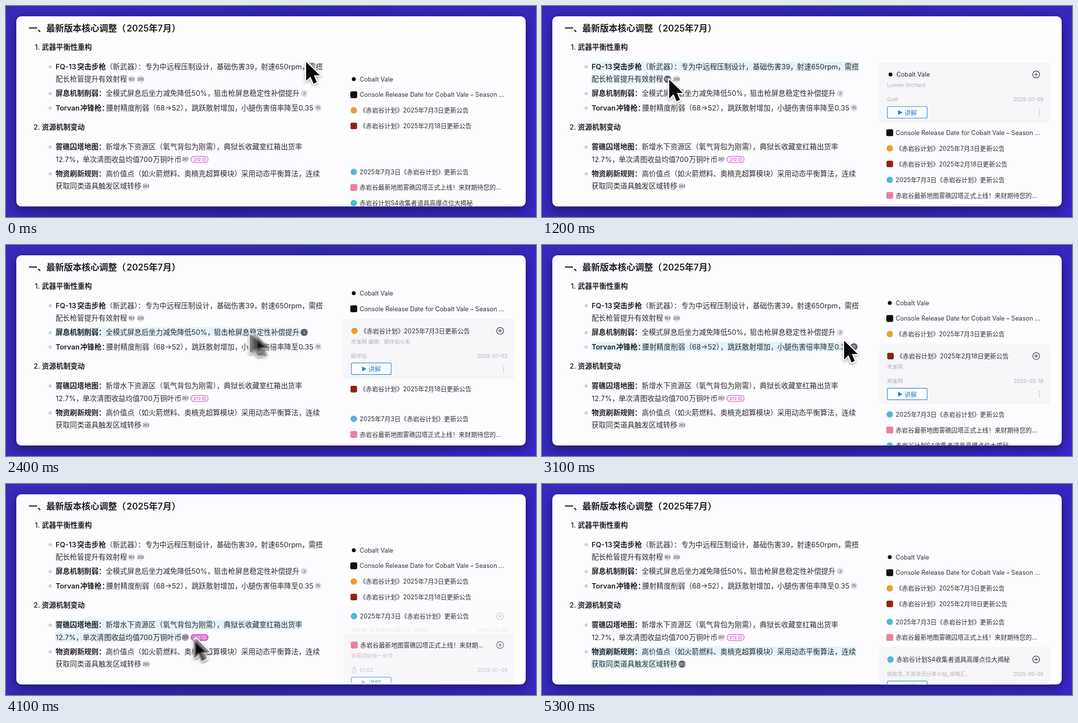
Write an HTML page with a canvas that moves like this. It is 1079x430 px and loops after 5400 ms.

```html
<!DOCTYPE html>
<html lang="zh-CN">
<head>
<meta charset="utf-8">
<title>资料引用悬停演示</title>
<style>
html, body { margin: 0; width: 100%; height: 100%; overflow: hidden; background: #3426b8; }
canvas { display: block; width: 1079px; height: 430px; }
</style>
</head>
<body>
<canvas id="stage"></canvas>
<script>
const W = 1079, H = 430, LOOP = 5400;
const FONT = 'Inter, "Noto Sans CJK SC", "Noto Sans CJK", "Noto Sans", sans-serif';
const canvas = document.getElementById('stage');
const dpr = window.devicePixelRatio || 1;
canvas.width = Math.round(W * dpr);
canvas.height = Math.round(H * dpr);
const ctx = canvas.getContext('2d');

const clamp = v => Math.max(0, Math.min(1, v));
const smooth = v => { v = clamp(v); return v * v * (3 - 2 * v); };
// Rises at a, falls at b, each over d ms.
const pulse = (t, a, b, d) => smooth((t - a) / d) * (1 - smooth((t - b) / d));

// Eased value between keys of the form [time, ...values].
function track(keys, t) {
  let i = 0;
  while (i < keys.length - 1 && keys[i + 1][0] <= t) i++;
  const a = keys[i], b = keys[i + 1] || a;
  const k = b === a ? 0 : smooth((t - a[0]) / (b[0] - a[0]));
  return a.slice(1).map((v, n) => v + (b[n + 1] - v) * k);
}

function text(str, x, y, size, color, weight = 400, align = 'left') {
  ctx.font = `${weight} ${size}px ${FONT}`;
  ctx.textAlign = align;
  ctx.fillStyle = color;
  ctx.fillText(str, x, y + size * 0.37);
}

function box(x, y, w, h, r, fill, stroke, line = 1) {
  ctx.beginPath();
  ctx.roundRect(x, y, w, h, r);
  if (fill) { ctx.fillStyle = fill; ctx.fill(); }
  if (stroke) { ctx.strokeStyle = stroke; ctx.lineWidth = line; ctx.stroke(); }
}

function disc(x, y, r, fill, stroke, line = 1) {
  ctx.beginPath();
  ctx.arc(x, y, r, 0, Math.PI * 2);
  if (fill) { ctx.fillStyle = fill; ctx.fill(); }
  if (stroke) { ctx.strokeStyle = stroke; ctx.lineWidth = line; ctx.stroke(); }
}

function faded(alpha, draw) {
  if (alpha <= 0) return;
  ctx.save();
  ctx.globalAlpha *= alpha;
  draw();
  ctx.restore();
}

/* ---------- article ---------- */

const BODY = 14.55, INK = '#2b2b30', BOLD = '#202024';

// y, then [x, text, bold]
const lines = [
  [123.5, [101, 'FQ-13', 1], [145, '突击步枪', 1], [203, '（新武器）'], [268.5, '：'],
    [283.5, '专为中远程压制设计，'], [429, '基础伤害39，'], [519, '射速650rpm，'], [616, '需搭']],
  [149, [101, '配长枪管提升有效射程']],
  [178, [101, '屏息机制削弱：', 1], [203, '全模式屏息后坐力减免降低50%，'], [423, '狙击枪屏息稳定性补偿提升']],
  [207.5, [101, 'Torvan', 1], [151, '冲锋枪：', 1], [204, '腰射精度削弱'], [291, '（68→52）'],
    [363, '，'], [378, '跳跃散射增加，'], [479, '小腿伤害倍率降至0.35']],
  [287, [101, '雾礁囚塔地图：', 1], [203, '新增水下资源区（氧气背包为刚需）'], [428.5, '，'],
    [443, '典狱长收藏室红箱出货率']],
  [312.5, [101, '12.7%，'], [156, '单次清图收益均值'], [272, '700'], [299, '万铜叶币']],
  [341.5, [101, '物资刷新规则：', 1], [203, '高价值点（如火箭燃料、奥楠克超算模块）'], [479, '采用动态平衡算法，连续']],
  [367, [101, '获取同类道具触发区域转移']]
];

// start, end, then [y, right edge] of each lit line
const lit = [
  [780, 1950, [123.5, 645], [149, 247]],
  [2100, 2700, [178, 599]],
  [2800, 3300, [207.5, 627]],
  [3450, 4510, [287, 603], [312.5, 357]],
  [4540, 9000, [341.5, 640], [367, 276]]
];

// x, y, label, active from, active until
const badges = [
  [255.5, 149, '163', 780, 1950],
  [274, 149, '200', 9000, 9000],
  [607, 178, '3', 2100, 2750],
  [635, 207.5, '10', 2800, 3300],
  [365, 312.5, '267', 4050, 4520],
  [285, 367, '263', 4360, 9000]
];

function badge(t, [x, y, label, a, b]) {
  const on = pulse(t, a, b, 120);
  disc(x, y, 7.3, '#dedee4');
  faded(on, () => disc(x, y, 7.3, '#5c5c66'));
  text(label, x, y, 7, on > 0.5 ? '#e6e6ec' : '#4c4c55', 500, 'center');
}

function pill(t) {
  const on = pulse(t, 3480, 4050, 120), pink = '#c53fc0';
  box(376.5, 306.5, 35, 12.5, 6.2, '#fdf3fd', pink, 1.1);
  faded(on, () => box(376, 306, 36, 13.5, 6.7, '#cc2fc0'));
  const c = on > 0.5 ? '#fbdcf8' : pink;
  text('272', 382, 312.8, 8, c, 500);
  box(400, 309.7, 6.5, 6, 1, null, c, 0.8);
  disc(403.2, 312.7, 1, c);
}

function article(t) {
  for (const [a, b, ...rows] of lit) {
    faded(pulse(t, a, b, 120), () => {
      for (const [y, right] of rows) box(100, y - 10, right - 100, 19, 2, '#e4f3fa');
    });
  }
  text('一、最新版本核心调整（', 46, 45, 18, BOLD, 600);
  text('2025年7月）', 245.5, 45, 18, BOLD, 600);
  text('1.', 58.5, 84, BODY, BOLD, 500);
  text('武器平衡性重构', 73, 84, BODY, BOLD, 600);
  text('2.', 56, 247, BODY, BOLD, 500);
  text('资源机制变动', 73, 247, BODY, BOLD, 600);
  for (const y of [124, 178.5, 208, 287.5, 342]) disc(90, y, 2.3, null, '#8a8a90', 1);
  for (const [y, ...parts] of lines) {
    for (const [x, str, bold] of parts) text(str, x, y, BODY, bold ? BOLD : INK, bold ? 600 : 400);
  }
  badges.forEach(b => badge(t, b));
  pill(t);
  box(53, 401, 592, 1, 0, '#f0f0f3');
}

/* ---------- reference list ---------- */

const ROW = 31.8, PUSH = 13;

const refs = [
  { title: 'Cobalt Vale', by: 'Lumen Orchard', from: 'Quill', date: '2025-07-09', icon: ['#111', 4, 1], open: [750, 1950] },
  { title: 'Console Release Date for Cobalt Vale – Season ...', icon: ['#111', 7, 0] },
  { title: '《赤岩谷计划》2025年7月3日更新公告', by: '岚雀网 编辑：砺伴站小禾', from: '砺伴站', date: '2025-07-02', icon: ['#e5a02e', 6.5, 1], open: [1950, 2750] },
  { title: '《赤岩谷计划》2025年2月18日更新公告', by: '岚雀网', from: '岚雀网', date: '2025-02-18', icon: ['#8c2417', 6.7, 0], open: [2750, 3300] },
  { title: '2025年7月3日《赤岩谷计划》更新公告', from: '挑枚签_手游资讯分享小站_攻略汇...', date: '2025-06-29', icon: ['#58b4d6', 6.5, 1], open: [4000, 4520] },
  { title: '赤岩谷最新地图雾礁囚塔正式上线！来财期待您的...', brief: '赤岩谷最新地图雾礁囚塔正式上线！来财期...', by: '青砾同好会一叔号', from: '01:02', clip: true, date: '2025-07-05', icon: ['#ec7f9f', 7, 0], open: [3300, 4000] },
  { title: '赤岩谷计划S4收集者道具高爆点位大揭秘', from: '挑枚签_手游资讯分享小站_攻略汇...', date: '2025-05-05', icon: ['#58b4d6', 6.5, 1], open: [4520, 9000] }
];

// time, first row of the upper group
const upper = [[0, 149], [750, 149], [1050, 126.5], [1950, 126.5], [2250, 98.3], [2750, 98.3],
  [3050, 118], [3300, 118], [3600, 130], [4000, 130], [4300, 149]];
// time, first row of the lower group
const lower = [[0, 338], [750, 338], [1050, 354.3], [2500, 354.3], [3050, 345], [3300, 345],
  [3600, 257.3], [4000, 257.3], [4300, 290], [4520, 290], [4820, 281]];

function button(y) {
  const blue = '#2f7fd6';
  box(703, y, 81, 23.5, 2, '#fbfdff', blue, 1.2);
  ctx.beginPath();
  ctx.moveTo(725, y + 7);
  ctx.lineTo(734, y + 12);
  ctx.lineTo(725, y + 17);
  ctx.fillStyle = blue;
  ctx.fill();
  text('讲解', 738, y + 12, 12.6, blue);
}

function plus(x, y) {
  disc(x, y, 7, null, '#3a3a40', 1.3);
  box(x - 3.6, y - 0.6, 7.2, 1.2, 0, '#3a3a40');
  box(x - 0.6, y - 3.6, 1.2, 7.2, 0, '#3a3a40');
}

function clock(x, y) {
  disc(x, y + 0.5, 4.7, null, '#a9a9b0', 1);
  box(x - 0.5, y - 2.5, 1, 4, 0, '#a9a9b0');
  box(x - 2, y - 6.2, 4, 1, 0, '#a9a9b0');
}

function details(ref, y) {
  const pale = '#b2b2b8', size = 10.7;
  if (ref.by) text(ref.by, 702.5, y + 22, size, pale);
  const row = y + (ref.by ? 51 : 29.5), top = row + 14.5;
  if (ref.clip) clock(709, row);
  text(ref.from, ref.clip ? 720 : 702.5, row, size, pale);
  text(ref.date, 1021, row, size, pale, 400, 'right');
  button(top);
  if (!ref.clip) for (const d of [-4.5, 0, 4.5]) disc(1013, top + 11.5 + d, 0.9, '#98989f');
}

function drawRef(ref, y, e) {
  const cy = y + PUSH * e, x = 708 + 1.5 * e;
  if (e > 0) {
    const full = ref.by ? 123 : 104;
    const top = cy - 16 - 9 * e, h = 32 + (full - 32) * e;
    ctx.save();
    ctx.beginPath();
    ctx.rect(687, top, 347, h);
    ctx.clip();
    ctx.globalAlpha = e;
    box(687, top, 347, h, 4, '#f6f6f9');
    details(ref, cy);
    plus(1006, cy);
    ctx.restore();
  }
  const [color, r, round] = ref.icon;
  if (round) disc(x, cy, r, color);
  else box(x - r, cy - r, r * 2, r * 2, 3, color);
  text(e > 0.5 && ref.brief || ref.title, 720 + 1.5 * e, cy, 12.6 + 0.05 * e, '#303036');
}

function list(t) {
  let y = track(upper, t)[0];
  refs.forEach((ref, i) => {
    if (i === 4) y = Math.max(y, track(lower, t)[0]);
    const e = ref.open ? pulse(t, ref.open[0], ref.open[1], 300) : 0;
    drawRef(ref, y, e);
    y += ROW + (ref.by ? 100 : 79) * e;
  });
}

/* ---------- pointer ---------- */

const path = [[0, 611, 114], [180, 611, 114], [880, 259, 150], [1950, 259, 150], [2637, 607, 196.5],
  [2750, 607, 196.5], [2950, 615, 195], [3250, 615, 195], [3802, 394, 312], [4020, 394, 312],
  [4200, 366, 324], [4350, 366, 324], [4790, 288, 372]];
const arrow = [[0, 0], [0, 16], [3.7, 12.4], [6.3, 18.4], [9.1, 17.2], [6.6, 11.4], [11.6, 11.4]];

function arrowAt(x, y) {
  ctx.beginPath();
  for (const [px, py] of arrow) ctx.lineTo(x + px * 2.4, y + py * 2.4);
  ctx.closePath();
  ctx.lineJoin = 'round';
  ctx.lineWidth = 5;
  ctx.strokeStyle = '#fff';
  ctx.save();
  ctx.shadowColor = 'rgba(0,0,0,.35)';
  ctx.shadowBlur = 5 * dpr;
  ctx.shadowOffsetY = 2 * dpr;
  ctx.stroke();
  ctx.restore();
  ctx.fillStyle = '#0a0a0c';
  ctx.fill();
}

function pointer(t) {
  const seen = 1 - smooth((t - 4950) / 200);
  const [x, y] = track(path, t);
  const [px, py] = track(path, Math.max(0, t - 22));
  const n = 1 + Math.min(6, Math.floor(Math.hypot(x - px, y - py) / 2));
  for (let i = 0; i < n; i++) {
    const k = n === 1 ? 1 : i / (n - 1);
    faded(seen / (i + 1), () => arrowAt(px + (x - px) * k, py + (y - py) * k));
  }
}

/* ---------- stage ---------- */

function backdrop() {
  const g = ctx.createLinearGradient(0, 0, W, H);
  g.addColorStop(0, '#3629bd');
  g.addColorStop(0.5, '#3027ad');
  g.addColorStop(1, '#3a25c6');
  ctx.fillStyle = g;
  ctx.fillRect(0, 0, W, H);
  ctx.save();
  ctx.shadowColor = 'rgba(12,10,60,.6)';
  ctx.shadowBlur = 22 * dpr;
  ctx.shadowOffsetY = 7 * dpr;
  box(21, 21, 1037, 387.5, 10, '#fdfcff');
  ctx.restore();
}

function draw(t) {
  ctx.setTransform(dpr, 0, 0, dpr, 0, 0);
  backdrop();
  ctx.save();
  ctx.beginPath();
  ctx.roundRect(21, 21, 1037, 387.5, 10);
  ctx.clip();
  article(t);
  list(t);
  ctx.restore();
  pointer(t);
}

const start = performance.now();
function tick() {
  draw((performance.now() - start) % LOOP);
  requestAnimationFrame(tick);
}
tick();
</script>
</body>
</html>
```
